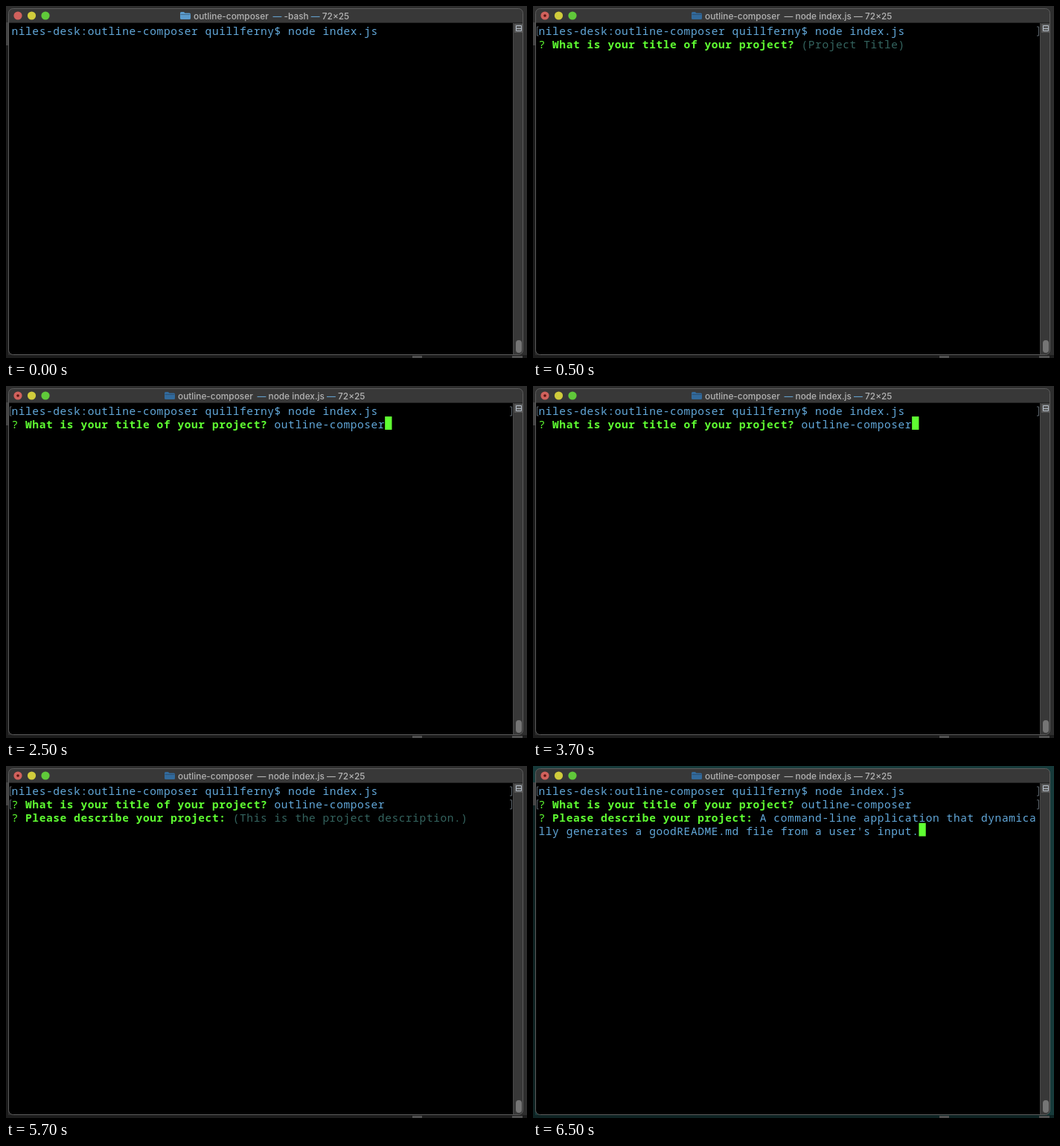
An HTML page for the animation above (8000 ms loop, 700 by 474 pixels).

```html
<!DOCTYPE html>
<html lang="en">
<head>
<meta charset="utf-8">
<title>Terminal prompts</title>
<style>
  html, body { margin: 0; width: 100%; height: 100%; overflow: hidden; background: #2e2e2e; }
  svg { display: block; width: 100vw; height: 100vh; }
  text { white-space: pre; }
  #title text { font: 500 11.85px Inter, Roboto, sans-serif; fill: #b4b4b4; }
  #screen text { font: 400 14.5px "Noto Sans Mono", "DejaVu Sans Mono", monospace; letter-spacing: .59px; }
  #screen .in { fill: #62a8da; }
  #screen .mark { fill: #5fff32; }
  #screen .ask { fill: #5fff32; font-weight: 700; }
  #screen .hint { fill: #34645f; font-weight: 300; }
</style>
</head>
<body>
<svg viewBox="0 0 700 474" preserveAspectRatio="none">
  <rect id="desk" width="700" height="474"/>
  <path d="M0 22H3V470H700V474H0Z" fill-opacity=".4"/>
  <rect y="22" width="3" height="31" fill="#444"/>
  <path d="M546 472.5h13M680 472.5h14" stroke="#505050" stroke-width="3"/>
  <rect x="3.5" y="3.5" width="691" height="466" rx="6" fill="#383838"/>
  <path d="M4 23H682V469.5H9Q4 469.5 4 464Z"/>
  <path d="M4 22.5H694" stroke="#242424"/>
  <path d="M681.5 23V469" stroke="#484848"/>
  <rect x="3.5" y="3.5" width="691" height="466" rx="6" fill="none" stroke="#5c5c5c"/>

  <g id="title">
    <circle cx="16" cy="13" r="5.6" fill="#d0615c"/>
    <circle id="dirty" cx="16" cy="13" r="1.8" fill="#58130f"/>
    <circle cx="34.5" cy="13" r="5.6" fill="#d0cc3c"/>
    <circle cx="53" cy="13" r="5.6" fill="#60c93a"/>
    <g id="name">
      <path id="folder" d="M0 9.5Q0 8 1.5 8H5L6.5 9.5H12.5Q14 9.5 14 11V16.5Q14 18 12.5 18H1.5Q0 18 0 16.5Z"/>
      <path d="M.5 11.5H13.5" stroke="#26323c" stroke-opacity=".45"/>
      <text x="18" y="17.5">outline-composer</text>
      <text x="124.5" y="17.5"><tspan class="dash">—</tspan> <tspan id="job"></tspan> <tspan class="dash">—</tspan> 72×25</text>
    </g>
  </g>

  <rect x="683" y="24" width="11" height="12" fill="#555"/>
  <path d="M685.5 26.5h7v7h-7zM686 30.5h6" fill="none" stroke="#b4bec8"/>
  <rect x="685" y="450" width="8" height="17" rx="4" fill="#757575"/>

  <g id="screen"></g>
</svg>
<script>
const LEFT = 7.5, CELL = 9.29, TOP = 39, ROW = 17.85, LOOP = 8000;
const $ = id => document.getElementById(id);

const command = [0, 0, "in", "niles-desk:outline-composer quillferny$ node index.js"];
const prompt = (row, label) => [[row, 0, "mark", "?"], [row, 2, "ask", label]];
const askTitle = prompt(1, "What is your title of your project?");
const askAbout = prompt(2, "Please describe your project:");
const answer = [1, 38, "in", "outline-composer"];

// Each scene: start time, runs of [row, column, style, text], bracketed rows, cursor cell
const scenes = [
  { at: 0, runs: [command], brackets: 0 },
  { at: 500, runs: [command, ...askTitle, [1, 38, "hint", "(Project Title)"]], brackets: 1 },
  { at: 2500, runs: [command, ...askTitle, answer], brackets: 1, cursor: [1, 54] },
  { at: 4500, runs: [command, ...askTitle, answer, ...askAbout,
      [2, 32, "hint", "(This is the project description.)"]], brackets: 2 },
  { at: 6500, runs: [command, ...askTitle, answer, ...askAbout,
      [2, 32, "in", "A command-line application that dynamica"],
      [3, 0, "in", "lly generates a goodREADME.md file from a user's input."]],
    brackets: 2, cursor: [3, 55] }
];

function add(tag, attrs, content = "") {
  const el = document.createElementNS("http://www.w3.org/2000/svg", tag);
  for (const key in attrs) el.setAttribute(key, attrs[key]);
  el.textContent = content;
  $("screen").append(el);
}

function draw(index) {
  const { runs, brackets, cursor } = scenes[index];
  const idle = index === 0;
  $("screen").replaceChildren();
  for (const [row, col, style, content] of runs)
    add("text", { x: LEFT + col * CELL, y: TOP + row * ROW, class: style }, content);
  for (let row = 0; row < brackets; row++) {
    const y = 28 + row * ROW;
    add("path", { d: `M7.5 ${y}H5.5v12h2M677 ${y}h2.5v12h-2.5`, fill: "none", stroke: "#5f6870" });
  }
  if (cursor) {
    const [row, col] = cursor;
    add("rect", { x: LEFT + col * CELL, y: 23.2 + row * ROW, width: CELL, height: ROW, fill: "#5fff32" });
  }
  $("dirty").style.display = idle ? "none" : "";
  $("job").textContent = idle ? "-bash" : "node index.js";
  $("name").setAttribute("transform", `translate(${idle ? 234 : 213} 0)`);
  $("folder").setAttribute("fill", idle ? "#5b9bcd" : "#326a9c");
  $("desk").setAttribute("fill", index === 4 ? "#173b3b" : "#2e2e2e");
  for (const dash of document.querySelectorAll(".dash"))
    dash.style.fill = index === 0 || index === 2 ? "#64a0cc" : "";
}

let shown = -1;
function tick(now) {
  const t = now % LOOP;
  const index = scenes.findLastIndex(scene => scene.at <= t);
  if (index !== shown) draw(shown = index);
  requestAnimationFrame(tick);
}
tick(performance.now());
</script>
</body>
</html>
```
